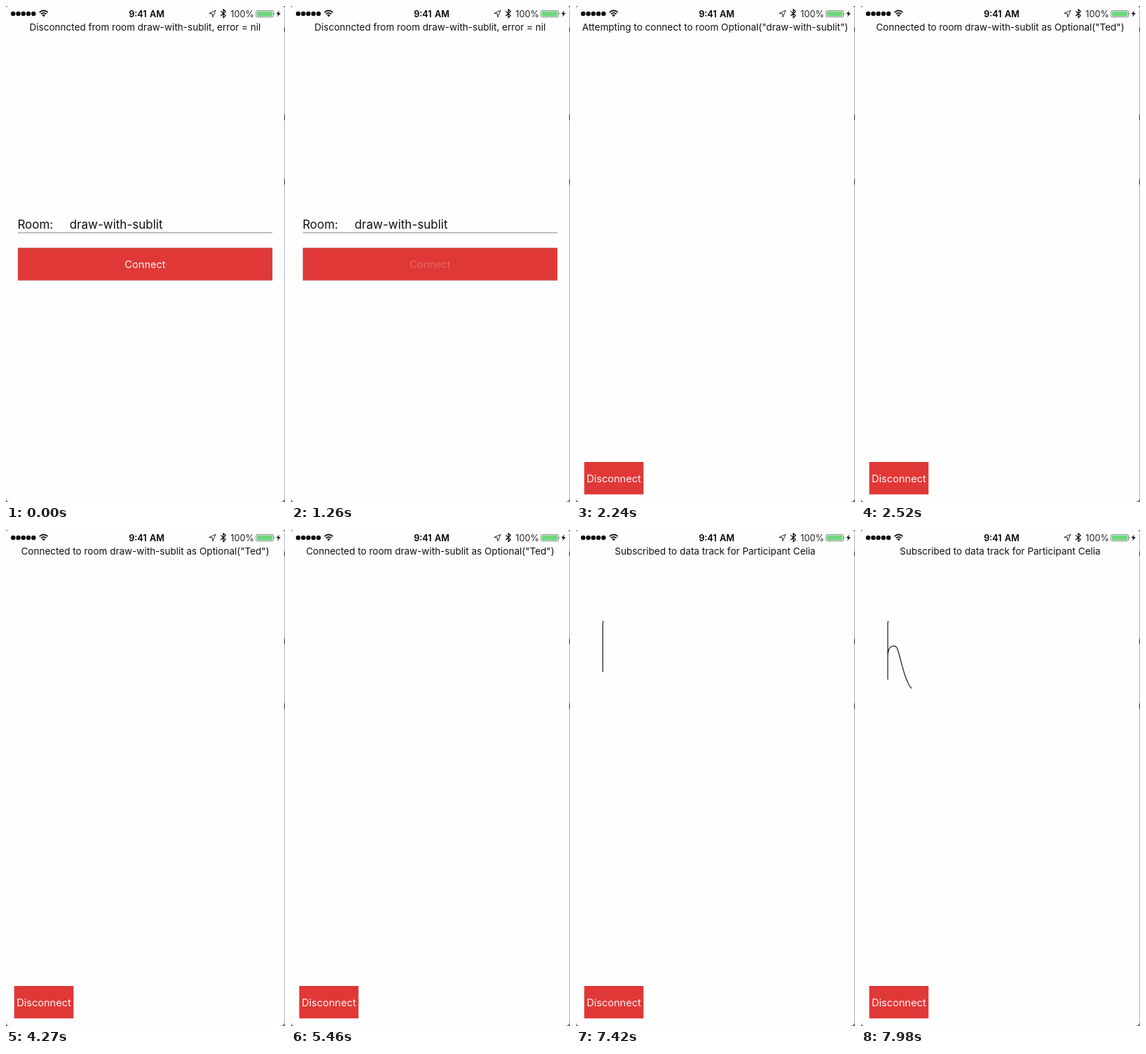
Recreate the animation shown at these times as an HTML page. Size 398 px wide and 706 px high, loop 8 s.

```html
<!DOCTYPE html>
<html lang="en">
<head>
<meta charset="utf-8">
<title>Shared drawing room</title>
<style>
  html, body { margin: 0; width: 100%; height: 100%; overflow: hidden; background: #fefefe; }
  svg { display: block; width: 398px; height: 706px; font-family: Inter, Roboto, sans-serif; }
  .button { font-size: 14.6px; text-anchor: middle; fill: #fdf3f3; }
  .button rect { fill: #e03837; }
  #lobby rect { stroke: #b54645; stroke-width: .8; }
  .line { fill: none; stroke: #111; stroke-linecap: round; stroke-linejoin: round; }
</style>
</head>
<body>
<svg viewBox="0 0 398 706">
  <!-- device edge -->
  <path fill="#777" d="M0 0H4Q0 0 0 4ZM398 0V5Q398 0 393 0ZM0 706V700Q0 706 6 706ZM398 706V699Q397 706 391 706Z"/>
  <path fill="#b4b4b4" d="M397 5h1v696h-1Z"/>
  <path fill="#333" d="M398 29.5Q395.6 33.5 398 37.5ZM398 153Q395.6 158.5 398 164ZM398 245Q395.6 250.5 398 256Z"/>

  <!-- status bar -->
  <path class="line" style="stroke-width:6.5" d="M10.2 11h0M17.5 11h0M24.7 11h0M32 11h0M39.3 11h0"/>
  <path class="line" stroke-width="1.7" style="stroke-linecap:butt" d="M47.7 9.2Q53.7 3.8 59.7 9.2M49.9 11.5Q53.7 8.2 57.5 11.5"/>
  <path fill="#111" d="M51.4 13Q53.7 11.2 56 13L53.7 15.4Z"/>
  <text x="200.5" y="15.5" font-size="12.7" font-weight="600" text-anchor="middle" word-spacing="1">9:41 AM</text>
  <path class="line" stroke-width=".9" d="M298.7 6.4L289.8 10.5L294.3 11L294.9 15.4Z"/>
  <path class="line" stroke-width="1.25" d="M306.6 7.6L313.3 13.6L310 16.8V4.6L313.3 7.7L306.6 13.8"/>
  <text x="354" y="15.5" font-size="12.7" text-anchor="end" fill="#222">100%</text>
  <rect x="356.6" y="6.4" width="25" height="9.4" rx="1.8" fill="#fff" stroke="#777" stroke-width=".8"/>
  <rect x="357.8" y="7.5" width="22.6" height="7.2" rx=".8" fill="#70d77e"/>
  <path fill="#555" d="M382.3 9.2Q383.8 11 382.3 13Z"/>
  <path fill="#111" d="M389.8 6.2L385.6 11.6H388.3L387.1 15.8L391.8 10.1H388.9Z"/>

  <text id="status" x="198.5" y="34.6" font-size="13.53" text-anchor="middle" fill="#111"></text>

  <g id="lobby">
    <g font-size="17" fill="#111">
      <text x="16.4" y="317">Room:</text>
      <text id="room" x="90.7" y="316.6"></text>
    </g>
    <path stroke="#b3b3b3" stroke-width="1.7" d="M17 322.7H380"/>
    <g class="button">
      <rect x="17.2" y="344.7" width="362.5" height="45.5"/>
      <text id="connect" x="198.5" y="373">Connect</text>
    </g>
  </g>

  <g id="canvas">
    <path id="ink" class="line" stroke-width="1.15" style="stroke-linecap:butt" pathLength="1"
      d="M38.8 129.5L38.2 133V212.5V178C38.8 169 42 165.2 46 165.2C50 165 51 166.5 52.5 171C57 184 60 203 66 215C68.3 220 69.5 225 72.8 225.2"/>
    <g class="button">
      <rect x="11.7" y="649" width="84.6" height="46.2"/>
      <text x="54" y="677.8">Disconnect</text>
    </g>
  </g>
</svg>
<script>
const LOOP = 8000, STEP = 70;
const PRESS = 1190, JOIN = 1330, INK_START = 7070, INK_END = 7980;
const ROOM = 'draw-with-sublit';
const messages = [
  [0, `Disconncted from room ${ROOM}, error = nil`],
  [JOIN, `Attempting to connect to room Optional("${ROOM}")`],
  [2520, `Connected to room ${ROOM} as Optional("Ted")`],
  [5530, 'Subscribed to data track for Participant Celia']
];
const $ = id => document.getElementById(id);
const show = (id, on) => $(id).setAttribute('visibility', on ? 'visible' : 'hidden');
$('room').textContent = ROOM;

function draw(now) {
  const t = Math.floor(now % LOOP / STEP) * STEP;
  const text = messages.filter(([start]) => t >= start).pop()[1];
  if ($('status').textContent !== text) $('status').textContent = text;

  show('lobby', t < JOIN);
  show('canvas', t >= JOIN);
  $('connect').setAttribute('opacity', t < PRESS ? 1 : 0.25);

  const p = Math.min(1, Math.max(0, (t - INK_START) / (INK_END - INK_START)));
  const drawn = p + Math.sin(2 * Math.PI * (p - .5)) * .04;
  $('ink').setAttribute('stroke-dasharray', `${drawn} 2`);
  $('ink').setAttribute('visibility', p > 0 ? 'inherit' : 'hidden');
  requestAnimationFrame(draw);
}
draw(performance.now());
</script>
</body>
</html>
```
